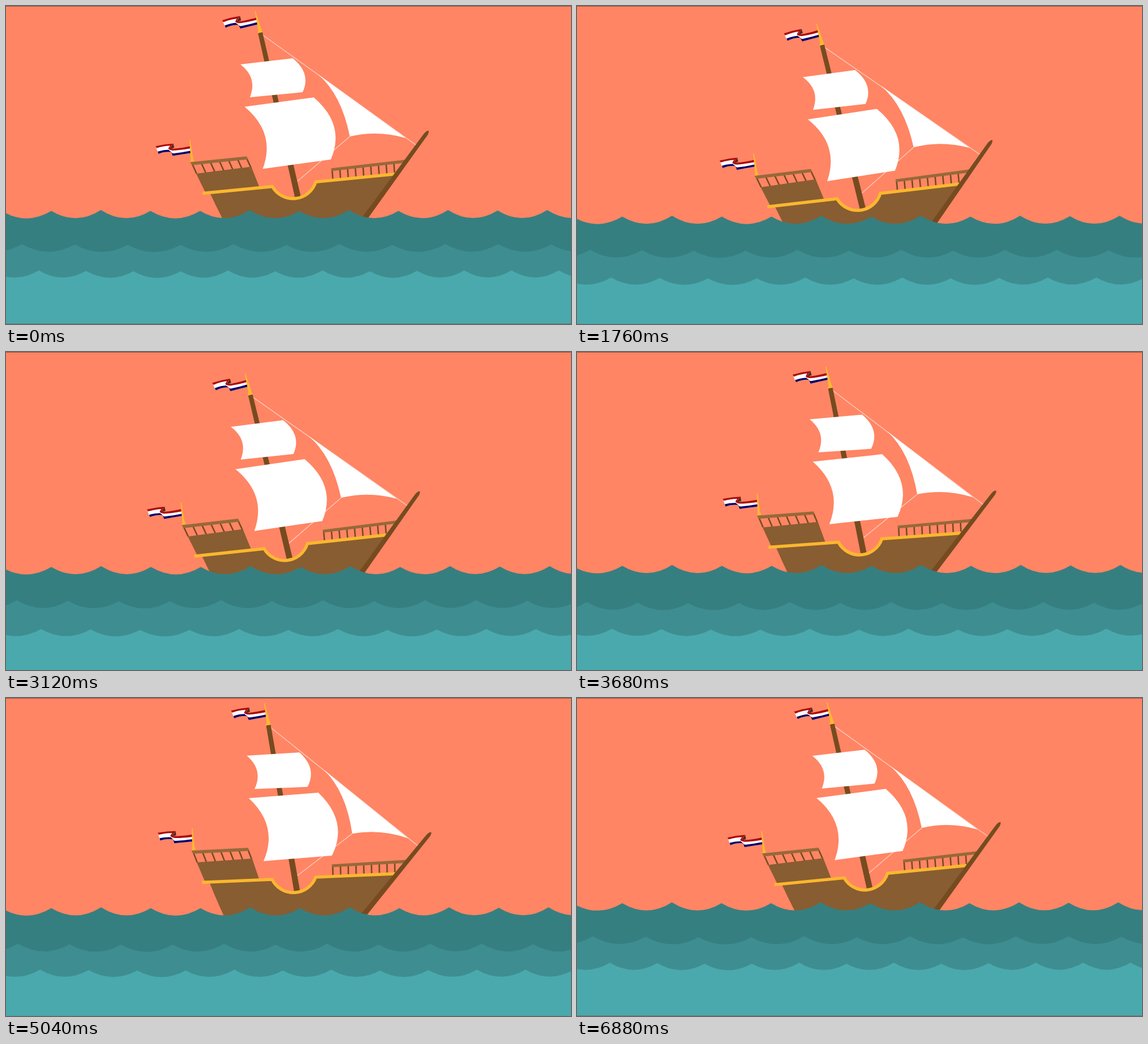
These frames come from a looping animation (998 by 561 pixels, 6.96 s). An HTML page:

```html
<!DOCTYPE html>
<html lang="en">
<head>
<meta charset="utf-8">
<title>Sailing ship</title>
<style>
  html, body { margin: 0; width: 100%; height: 100%; overflow: hidden; background: #ff8564; }
  svg { display: block; width: 100vw; height: 100vh; }
</style>
</head>
<body>
<svg viewBox="0 0 998 561" preserveAspectRatio="none">
  <defs>
    <g id="flag">
      <path fill="#4d2b23" d="M434.5 17L436 24.500L427 27.500Z"/>
      <path fill="#fff" d="M403 23Q420 19 433 18.500L426 26L430 31Q418 29 407 33.500Z"/>
      <path fill="#ae0808" d="M402.500 22Q419 18 434.500 17Q432 20 429.500 21Q419 21 404.500 25.500Z"/>
      <path fill="#00006e" d="M406.500 31.500Q418 28 428 28.500L430 32Q418 31 408 35.500Z"/>
      <path fill="#fff" d="M427 26.500Q432 30 465 23.500L466 31Q448 35.500 433 36Q432 31 427 29.500Z"/>
      <path fill="#ae0808" d="M434.500 17Q430 22 428 25.500Q432 28 464.500 21.500L465 25.500Q446 29 434 29.500Q427 29 425.500 26Q428 20 434.500 17Z"/>
      <path fill="#00006e" d="M430.500 32.500Q432 35 436 34.500Q450 33 466 29.500L466.500 33.500Q450 36 433.500 39Q432.500 35 430.500 32.500Z"/>
    </g>
  </defs>
  <rect width="998" height="561" fill="#ff8564"/>
  <path d="M0 0H998V.6H0ZM0 560.500H998V561H0Z" fill="#000" fill-opacity=".8"/>

  <g id="ship">
    <g stroke="#ffc9ba" stroke-width="1.400">
      <path d="M472 53L731 269M612.500 243L513 316"/>
    </g>
    <path fill="#764b20" d="M464 49L472 48L518.500 343L508 344Z"/>
    <g fill="#fff">
      <path d="M565 130L711 253Q662 235 612.500 243Q603 168 565 130Z"/>
      <path d="M429 102L522 98Q553 127 535 159L441.500 161Q458 128 429 102Z"/>
      <path d="M431 177L554 169.500Q607 222 576 281L455 288.500Q483 227 431 177Z"/>
    </g>
    <use href="#flag"/>
    <use href="#flag" transform="translate(269.500 235) rotate(4.700) scale(.98) translate(-403 -22)"/>
    <g fill="#fbb72f">
      <path d="M461 10H462.500L470.500 43L472.500 48L463 49.500L465 44Z"/>
      <path d="M329.300 228H331L333.500 261L335.500 266L328 267.500L329.500 262Z"/>
    </g>

    <path id="posts" fill="none" stroke="#764b20" stroke-width="2.600"/>
    <g fill="#976939">
      <path d="M328 267.500L428 264.500L430.500 270L330.500 273Z"/>
      <path d="M575.500 296.500L707 291L703 296.500L575.500 301.500Z"/>
    </g>
    <g fill="#885d31">
      <path d="M337 288.500L435 283.500L446.500 320L351 323Z"/>
      <path d="M359 325L469.500 321A42 42 0 0 0 546.500 318.500L687 315L604 415H397Q374 365 359 325Z"/>
    </g>
    <path fill="none" stroke="#fbb72f" stroke-width="5.500" d="M345.500 324L469.500 321A42 42 0 0 0 546.500 318.500L687 315"/>
    <path fill="#764b20" d="M743 248Q748 242.500 752 243Q753 245 750 250L639 383L613 414H600L627 383Z"/>
  </g>

  <path id="back" fill="#367f80"/>
  <path id="middle" fill="#3e8e91"/>
  <path id="front" fill="#4aa9ad"/>
</svg>
<script>
const LOOP = 6960, STEP = 80;
const el = id => document.getElementById(id);

// time, rotation, centre x, centre y
const voyage = [
  [0, -4.2, 514, 199.3],
  [2820, -5.9, 492.7, 232.5],
  [4400, 0, 521.6, 205.2],
  [LOOP, -4.3, 515.4, 198]
];

// x, gap and y: [at rest, change at the peak]; dips lower single crests
const waves = [
  { path: el('back'), peak: 3190, x: [80, 0], gap: [87.6, .45], y: [360, 18.1], depth: 13.5, dips: '220220202010' },
  { path: el('middle'), peak: 3830, x: [28, -11.1], gap: [93.5, -4.06], y: [420, 22.2], depth: 13, dips: '101220202001' },
  { path: el('front'), peak: 3353, x: [58, 4.2], gap: [83.5, 4.2], y: [466.5, 23.8], depth: 12, dips: '101220202100' }
];

function drawPosts() {
  let d = '';
  for (let i = 0; i < 7; i++) {
    const x = 331.5 + i * 16.1, y = 271.5 - i * .5;
    d += `M${x} ${y}l6.300 17`;
  }
  for (let i = 0; i < 9; i++) d += `M${577 + i * 13.7} ${299 - i * .5}v18`;
  el('posts').setAttribute('d', d);
}

function sample(keys, t) {
  const i = Math.max(1, keys.findIndex(k => k[0] >= t));
  const a = keys[i - 1], b = keys[i], u = (t - a[0]) / (b[0] - a[0]);
  return a.slice(1).map((v, j) => v + (b[j + 1] - v) * u);
}

function drawWave(w, t) {
  const u = t < w.peak ? t / w.peak : (LOOP - t) / (LOOP - w.peak);
  const at = ([rest, change]) => rest + change * u;
  const x = at(w.x), gap = at(w.gap), y = at(w.y);
  const crest = i => y + .8 * (w.dips[i + 1] || 0);
  let d = `M${x - gap} ${crest(-1)}`;
  for (let i = 0; i < 13; i++) {
    d += `Q${x + (i - .5) * gap} ${y + .8 + w.depth * 2} ${x + i * gap} ${crest(i)}`;
  }
  w.path.setAttribute('d', `${d}V${560.3 + u}H${x - gap}Z`);
}

function render(t) {
  const [angle, x, y] = sample(voyage, t);
  el('ship').setAttribute('transform', `translate(${x} ${y}) rotate(${angle}) translate(-521.67 -205.33)`);
  waves.forEach(w => drawWave(w, t));
}

drawPosts();
render(0);
const start = performance.now();
function tick() {
  const t = (performance.now() - start) % LOOP;
  render(Math.floor(t / STEP) * STEP);
  requestAnimationFrame(tick);
}
requestAnimationFrame(tick);
</script>
</body>
</html>
```
